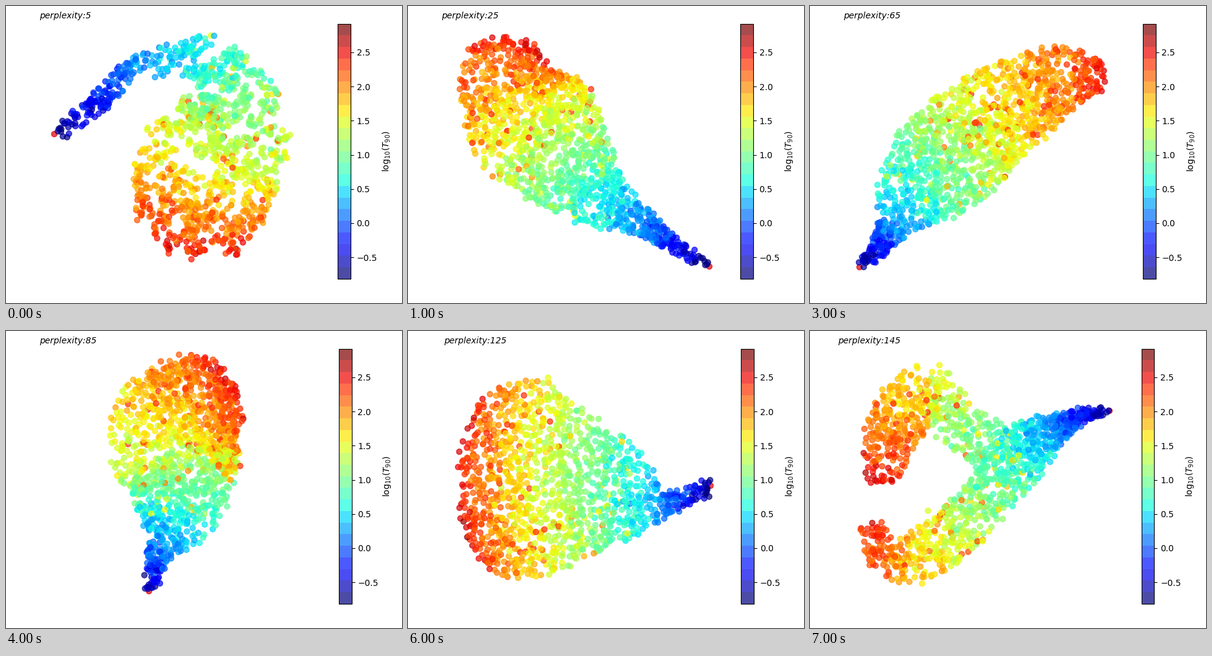
Write a matplotlib script that moves like this. It is 640 px wide and 480 px high and loops after 8 s.

```python
import numpy as np
import matplotlib.pyplot as plt
from matplotlib.animation import FuncAnimation
from matplotlib.cm import ScalarMappable
from matplotlib.colors import Normalize

W, H = 640, 480
VMIN, VMAX = -0.813, 2.917
BURSTS = 1250
STEP = 0.48          # rise of log10(T90) from one key point to the next
BEND = 0.22          # how far the flanks of a band lag behind its middle
LEFT, UP = (-1, 0), (0, -1)

# Each shape: key points (x, y, half width) from the shortest bursts to the longest.
ring = [(78, 207, 3), (150, 160, 14), (198, 92, 13), (335, 80, 32),
        (375, 180, 80), (325, 270, 120), (310, 345, 112), (300, 408, 65)]
comet = [(487, 421, 4), (435, 390, 11), (385, 353, 17), (300, 305, 52),
         (245, 245, 82), (190, 170, 110), (165, 100, 92), (180, 50, 45)]
boot = [(80, 422, 4), (110, 393, 16), (137, 357, 22), (165, 300, 62),
        (235, 235, 92), (295, 178, 82), (415, 113, 60), (484, 113, 22)]
dome = [(382, 419, 6), (364, 393, 12), (360, 352, 14), (395, 285, 70),
        (330, 215, 75), (245, 165, 148), (237, 108, 142), (262, 55, 78)]
fan = [(489, 250, 12), (455, 268, 14), (412, 282, 18), (355, 260, 75),
       (275, 250, 108), (190, 236, 160), (120, 240, 160), (78, 245, 115)]
trunk = [(484, 129, 4), (440, 135, 9), (400, 155, 22), (335, 205, 50)]
upper = trunk + [(240, 160, 36), (190, 75, 38), (128, 165, 50), (115, 255, 20)]
lower = trunk + [(270, 290, 38), (195, 355, 45), (125, 388, 30), (92, 300, 18)]


def mirror(keys):
    return [(564 - x, y, w) for x, y, w in keys]


def blend(a, b):
    return (np.array(a) + np.array(b)) / 2


def smooth(col, size=33):
    """Rounded path through evenly spaced key values."""
    u = np.linspace(0, len(col) - 1, 281)
    path = np.interp(u, np.arange(len(col)), col)
    return np.convolve(np.pad(path, size // 2, mode="edge"),
                       np.ones(size) / size, "valid")


def sample(keys, n, heading, rng):
    """Points (x, y, value) spread over the area swept along the spine."""
    x, y, w = (smooth(c) for c in np.transpose(keys))
    u = np.linspace(0, len(keys) - 1, len(x))
    step = np.column_stack([np.gradient(x), np.gradient(y)])
    if heading:
        ahead = np.tile(np.array(heading, float), (len(x), 1))
    else:
        ahead = step / np.linalg.norm(step, axis=1, keepdims=True)
    area = w * np.abs((step * ahead).sum(1)) * np.where(u < 2, 3, 1)
    i = rng.choice(len(x), n, p=area / area.sum())
    s = rng.uniform(-1, 1, n)
    fx, fy = ahead[i].T
    side, lag = w[i] * s, BEND * w[i] * s**2
    return np.column_stack([x[i] - fy * side - fx * lag,
                            y[i] + fx * side - fy * lag,
                            VMIN + STEP * u[i]])


def spread(points, tries=2):
    """Keep from each group of candidates the one farthest from those kept."""
    kept = points[:1]
    for group in points[tries:].reshape(-1, tries, 3):
        gaps = group[:, None, :2] - kept[None, :, :2]
        best = (gaps**2).sum(2).min(1).argmax()
        kept = np.vstack([kept, group[best]])
    return kept


def cloud(seed, *limbs, heading=None, clump=1):
    rng = np.random.default_rng(seed)
    n = 2 * BURSTS // (clump * len(limbs)) // 2 * 2
    p = np.vstack([sample(k, n, heading, rng) for k in limbs])
    p = np.repeat(spread(rng.permutation(p)), clump, axis=0)
    p[:, :2] += rng.normal(0, 2.5 if clump == 1 else 5, (len(p), 2))

    v = p[:, 2]
    body = v > 0.6
    odd = body & (rng.random(len(v)) < 0.08)
    v += rng.normal(0, 0.14, len(v))
    longer = np.maximum(v, np.minimum(v + rng.uniform(0.3, 1.1, len(v)), 2.4))
    p[:, 2] = np.where(odd, longer, v)

    tip = (*limbs[0][0][:2], 2.6)      # one long burst among the shortest
    return np.vstack([tip, rng.permutation(p)])


# (points, colour bar left edge, title left edge)
views = [
    (cloud(5, ring, clump=4), 536.2, 54.3),
    (cloud(25, comet), 537.2, 54.3),
    (cloud(45, blend(mirror(comet), boot)), 538, 54.3),
    (cloud(65, boot), 538, 54.3),
    (cloud(85, blend(boot, dome)), 538, 54.3),
    (cloud(105, dome, heading=UP), 538, 54.3),
    (cloud(125, fan, heading=LEFT), 538.4, 58.3),
    (cloud(145, upper, lower), 535.8, 45.3),
]


def bar_box(left):
    return [left / W, 39.23 / H, 20.6 / W, 412 / H]


fig = plt.figure(figsize=(W / 100, H / 100), dpi=100, facecolor="white")
ax = fig.add_axes([0, 0, 1, 1])
ax.set(xlim=(0, W), ylim=(H, 0))
ax.axis("off")
norm = Normalize(VMIN, VMAX)
dots = ax.scatter([], [], s=42, c=[], cmap="jet", norm=norm, alpha=0.7)
title = ax.text(0, 20, "", fontsize=10, style="italic")

cax = fig.add_axes(bar_box(538))
bands = ScalarMappable(norm, plt.get_cmap("jet", 22))
fig.colorbar(bands, cax=cax, alpha=0.7, label=r"log$_{10}(T_{90})$")


def update(i):
    points, bar_x, title_x = views[i]
    dots.set_offsets(points[:, :2])
    dots.set_array(points[:, 2])
    title.set_text(f"perplexity:{5 + 20 * i}")
    title.set_x(title_x)
    cax.set_position(bar_box(bar_x))
    return dots, title


anim = FuncAnimation(fig, update, frames=len(views), interval=1000,
                     repeat=True, repeat_delay=0, blit=False)
plt.show()
```
